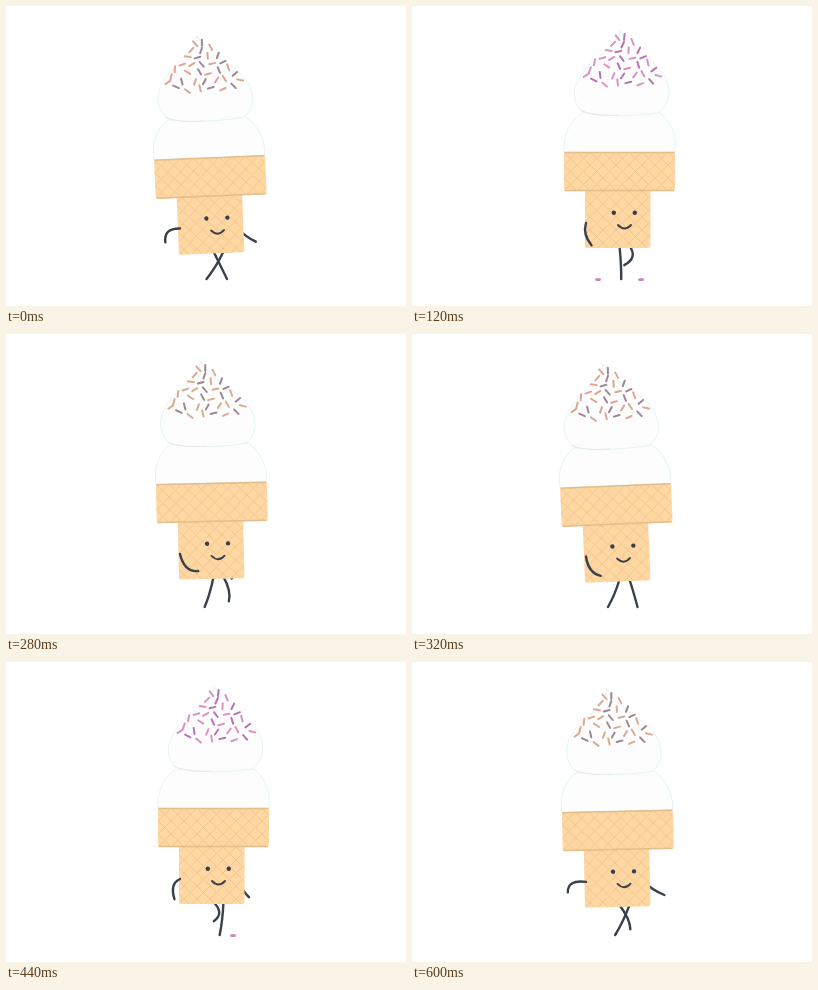
Write an HTML page that moves like this. It is 400 by 300 pixels and loops after 640 ms.

```html
<!DOCTYPE html>
<html lang="en">
<head>
<meta charset="utf-8">
<title>Walking ice cream</title>
<style>
  html, body { margin: 0; width: 100%; height: 100%; overflow: hidden; background: #fff; }
  svg { display: block; width: 100vw; height: 100vh; }
  .limb { fill: none; stroke: #38404b; stroke-width: 2.4; stroke-linecap: round; stroke-linejoin: round; }
  .cream { fill: #fdfdfd; stroke: #e0f5f3; stroke-width: .9; }
  .edge { fill: none; stroke: #e3bd8c; stroke-width: 1.5; }
  #sprinkles { stroke-width: 2; stroke-linecap: round; }
</style>
</head>
<body>
<svg viewBox="0 0 400 300">
  <defs>
    <pattern id="waffle" width="13" height="13" patternUnits="userSpaceOnUse" x="152" y="146">
      <rect width="13" height="13" fill="#fed7a3"/>
      <path d="M0 0L13 13M13 0L0 13" stroke="#f2c68c"/>
    </pattern>
  </defs>
  <g id="marks">
    <ellipse cy="273.5" rx="3" ry="1.6"/>
    <ellipse cy="273.5" rx="3" ry="1.6"/>
  </g>
  <path id="legA" class="limb"/>
  <path id="legB" class="limb"/>
  <path id="armB" class="limb"/>
  <g id="body">
    <g id="top">
      <path class="cream" d="M152 146C151 128 158 115 170 107L248 107C259 115 265 130 263 146Z"/>
      <path class="cream" d="M208 24C207 42 178 52 167 72C160 84 161 99 171 106C190 111 230 110 246 107C257 100 260 85 253 71C244 54 222 48 208 24Z"/>
      <path d="M168 104Q182 111 206 109" fill="none" stroke="#e9e9e9"/>
      <g id="sprinkles"></g>
    </g>
    <rect x="173" y="183" width="65.5" height="59" rx="2" fill="url(#waffle)"/>
    <rect x="152" y="146" width="111" height="39" rx="2" fill="url(#waffle)"/>
    <path class="edge" d="M152.5 146.5H262.5M153 184.5H262"/>
    <g fill="#3b3f47">
      <circle cx="201.8" cy="206.8" r="2.2"/>
      <circle cx="222.8" cy="206.8" r="2.2"/>
    </g>
    <path d="M206 219Q212.5 226 219 219" fill="none" stroke="#3b3f47" stroke-width="1.9" stroke-linecap="round"/>
  </g>
  <path id="armA" class="limb"/>
</svg>
<script>
const LOOP = 640, STEP = 40, TURN = 2 * Math.PI;
const $ = id => document.getElementById(id);

// Pulse between 0 and 1, once per footstep
const pulse = (t, power) => ((1 + Math.cos(TURN * t / (LOOP / 2))) / 2) ** power;

let seed = 7;
const random = () => (seed = seed * 16807 % 2147483647) / 2147483647;
const jitter = size => (random() - .5) * size;

// Sprinkles fan out from the tip in rows that sag in the middle
const sprinkles = [];
for (let row = 0; row < 7; row++) {
  const count = row + 2;
  for (let i = 0; i < count; i++) {
    const u = 2 * i / (count - 1) - 1;
    const x = 210.5 + u * (3 + 5.8 * row) + jitter(4);
    const y = 30 + 6.8 * row + row * (1 - u * u) * 1.2 + jitter(4);
    const line = document.createElementNS('http://www.w3.org/2000/svg', 'path');
    line.setAttribute('d', 'M-3 0H3');
    line.setAttribute('transform', `translate(${x} ${y}) rotate(${random() * 180})`);
    $('sprinkles').append(line);
    sprinkles.push(line);
  }
}

function curve(id, x, y, kneeX, kneeY, endX, endY) {
  $(id).setAttribute('d', `M${x} ${y}Q${kneeX} ${kneeY} ${endX} ${endY}`);
}

function drawBody(t, drop, weight) {
  const lean = pulse(t + 24, 3);
  $('body').setAttribute('transform', `translate(0 ${drop}) rotate(${-2.4 * weight} 206 241)`);
  $('top').setAttribute('transform', `translate(0 146) skewX(${4.5 * lean}) translate(0 -146)`);
  const light = `hsl(${320 + 65 * lean}, 53%, 72%)`;
  const dark = `hsl(${300 + 40 * lean}, ${32 - 22 * lean}%, 58%)`;
  sprinkles.forEach((s, i) => s.setAttribute('stroke', i % 5 % 2 ? dark : light));
}

function drawArms(t, drop) {
  const s = Math.cos(TURN * (t - 250) / LOOP);
  const x = 174, y = 217 + drop;
  curve('armA', x, y, x - 7 + 12 * s, y + 8 + 11 * s, x + 19 * s, y + 22 + 3.5 * s - 9 * s * s);
  const handX = 239 - 14 * s, handY = 237 + 6 * s + drop * .6;
  curve('armB', 231, 216 + drop, 236 - 4 * s, handY - 5, handX, handY);
}

function drawLeg(id, t, hipX, hipY, footX) {
  const angle = TURN * t / LOOP;
  const lift = Math.max(0, -Math.sin(angle));
  const x = footX + 12.5 * Math.cos(angle) ** 3, y = 273 - 15 * lift;
  curve(id, hipX, hipY, (hipX + x) / 2 + 1 + 11 * lift, (hipY + y) / 2 + 2, x, y);
}

function drawMarks(t) {
  const landing = t >= 80 && t < 240, passing = t >= 360 && t < 480;
  const places = landing ? [186, 229] : passing ? [241 - (t - 360) * .175] : [];
  const pink = t < 160 || t >= 400;
  [...$('marks').children].forEach((dot, i) => {
    dot.style.display = i < places.length ? '' : 'none';
    dot.setAttribute('cx', places[i] || 0);
    dot.setAttribute('fill', pink ? '#cf86b3' : '#7590cc');
  });
}

function draw(now) {
  const t = Math.floor(now % LOOP / STEP) * STEP;
  const weight = pulse(t, 4), drop = 5.5 * weight;
  drawBody(t, drop, weight);
  drawArms(t, drop);
  drawLeg('legA', t, 207.5, 240 + drop, 208.5);
  drawLeg('legB', t + LOOP / 2, 217.5, 240 + drop, 213);
  drawMarks(t);
}

const start = performance.now();
function tick() {
  draw(performance.now() - start);
  requestAnimationFrame(tick);
}
tick();
</script>
</body>
</html>
```
